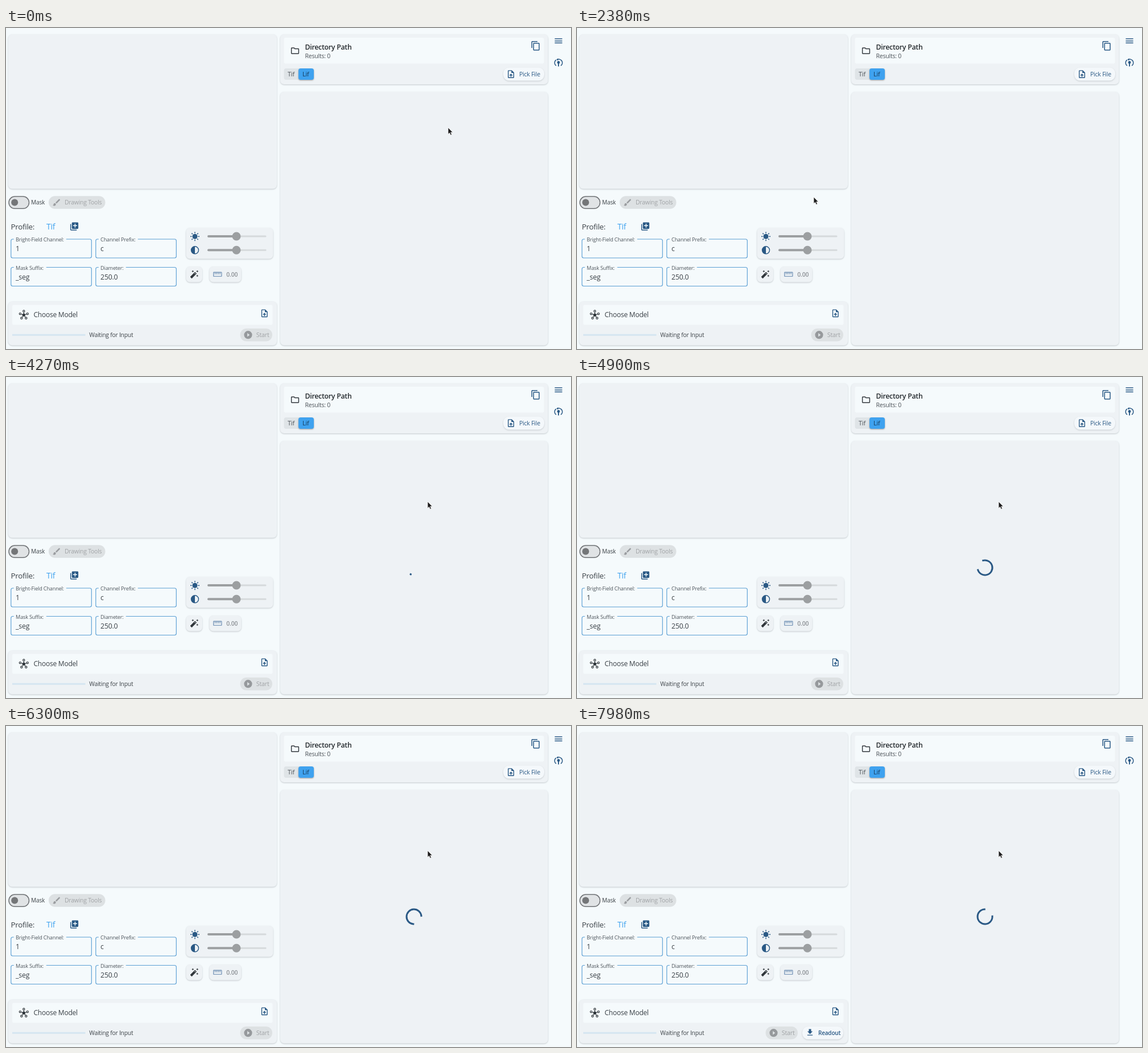
Animation, 993 px wide and 564 px high, one loop 8 s. Source, as an HTML page:

```html
<!DOCTYPE html>
<html lang="en">
<head>
<meta charset="utf-8">
<title>Segmentation panel</title>
<style>
  html, body { margin: 0; width: 100%; height: 100%; overflow: hidden; background: #f5fafc; }
  svg { display: block; width: 100%; height: 100%; }
  text { font-family: "Open Sans", "Noto Sans", sans-serif; letter-spacing: -.02em; white-space: pre; }
  .card { fill: #eef2f5; filter: drop-shadow(0 1px 1px rgba(40, 50, 60, .24)); }
  .soft { fill: #f4f8fb; filter: drop-shadow(0 1px .8px rgba(40, 50, 60, .2)); }
  .off { fill: #dde1e3; }
  .field { fill: none; stroke: #5b9fd4; stroke-width: 1.15; }
</style>
</head>
<body>
<svg id="stage" viewBox="0 0 993 564" xmlns="http://www.w3.org/2000/svg"></svg>
<script>
const NS = 'http://www.w3.org/2000/svg';
const stage = document.getElementById('stage');
const BG = '#f5fafc', NAVY = '#2a5985', INK = '#30363b', GREY = '#9a9da0', BLUE = '#3fa2ef';

const ICONS = {
  folder: 'M9.17 6l2 2H20v10H4V6h5.17M10 4H4c-1.1 0-1.99.9-1.99 2L2 18c0 1.1.9 2 2 2h16c1.1 0 2-.9 2-2V8c0-1.1-.9-2-2-2h-8l-2-2z',
  copy: 'M16 1H4c-1.1 0-2 .9-2 2v14h2V3h12V1zm3 4H8c-1.1 0-2 .9-2 2v14c0 1.1.9 2 2 2h11c1.1 0 2-.9 2-2V7c0-1.1-.9-2-2-2zm0 16H8V7h11v14z',
  menu: 'M3 18h18v-2H3v2zm0-5h18v-2H3v2zm0-7v2h18V6H3z',
  upload: 'M14 2H6c-1.1 0-2 .9-2 2v16c0 1.1.9 2 2 2h12c1.1 0 2-.9 2-2V8l-6-6zm4 18H6V4h7v5h5v11zM8 15l1.4 1.4 1.6-1.6V19h2v-4.2l1.6 1.6L16 15l-4-4z',
  add: 'M4 6H2v14c0 1.1.9 2 2 2h14v-2H4V6zm16-4H8c-1.1 0-2 .9-2 2v12c0 1.1.9 2 2 2h12c1.1 0 2-.9 2-2V4c0-1.1-.9-2-2-2zm-1 9h-4v4h-2v-4H9V9h4V5h2v4h4v2z',
  brush: 'M7 14c-1.66 0-3 1.34-3 3 0 1.31-1.16 2-2 2 .92 1.22 2.49 2 4 2 2.21 0 4-1.79 4-4 0-1.66-1.34-3-3-3zm13.71-9.37l-1.34-1.34c-.39-.39-1.02-.39-1.41 0L9 12.25 11.75 15l8.96-8.96c.39-.39.39-1.02 0-1.41z',
  ruler: 'M21 6H3c-1.1 0-2 .9-2 2v8c0 1.1.9 2 2 2h18c1.1 0 2-.9 2-2V8c0-1.1-.9-2-2-2zm0 10H3V8h2v4h2V8h2v4h2V8h2v4h2V8h2v4h2V8h2v8z',
  play: 'M12 2a10 10 0 1 0 0 20 10 10 0 0 0 0-20zm-2 14.5v-9l6 4.5-6 4.5z',
  download: 'M19 9h-4V3H9v6H5l7 7 7-7zM5 18v2h14v-2H5z',
  wand: 'M20 7l.94-2.06L23 4l-2.06-.94L20 1l-.94 2.06L17 4l2.06.94zM8.5 7l.94-2.06L11.5 4l-2.06-.94L8.5 1l-.94 2.06L5.5 4l2.06.94zM20 12.5l-.94 2.06-2.06.94 2.06.94.94 2.06.94-2.06 2.06-.94-2.06-.94zM14.2 6l-.7.3L2.3 17.5a1 1 0 0 0 0 1.4l2.8 2.8a1 1 0 0 0 1.4 0L17.7 10.5a1 1 0 0 0 0-1.4l-2.8-2.8zM14.2 8.4l1.4 1.4-1.3 1.3-1.4-1.4z'
};

function add(tag, attrs, parent = stage) {
  const el = document.createElementNS(NS, tag);
  for (const key in attrs) el.setAttribute(key, attrs[key]);
  parent.appendChild(el);
  return el;
}
const box = (x, y, w, h, rx, look, parent) => add('rect', { x, y, width: w, height: h, rx, ...look }, parent);
const dot = (cx, cy, r, look, parent) => add('circle', { cx, cy, r, ...look }, parent);
const line = (d, stroke, width, look, parent) =>
  add('path', { d, stroke, 'stroke-width': width, fill: 'none', ...look }, parent);

function label(x, y, size, str, fill = INK, weight = 400, parent = stage) {
  add('text', { x, y, 'font-size': size, 'font-weight': weight, fill }, parent).textContent = str;
}
function icon(name, cx, cy, size, fill = NAVY, parent = stage) {
  const s = size / 24;
  add('path', { d: ICONS[name], fill, 'fill-rule': 'evenodd',
    transform: `translate(${cx - size / 2} ${cy - size / 2}) scale(${s})` }, parent);
}
const card = (x, y, w, h, rx = 7) => box(x, y, w, h, rx, { class: 'card' });
function around(n, start, fn) {
  for (let i = 0; i < n; i++) {
    const a = start + i * 2 * Math.PI / n;
    fn(Math.cos(a), Math.sin(a));
  }
}

function drawFiles() {
  card(482, 11, 470.5, 88);
  box(488.5, 17, 457, 45.5, 3, { fill: BG });
  icon('folder', 508, 40, 17, INK);
  label(525.5, 38, 12.3, 'Directory Path', '#24292d', 600);
  label(525.5, 52.6, 10.5, 'Results: 0', '#4a5056');
  icon('copy', 931, 31.3, 18);
  box(488.5, 71, 40, 20, 4, { fill: '#dfe4e7' });
  box(514, 71, 27, 20, 4, { fill: BLUE, style: 'filter:drop-shadow(0 1px 1.2px rgba(0,0,0,.35))' });
  label(495, 84.7, 11, 'Tif', '#4b5157');
  label(521, 84.7, 11, 'Lif', '#173d5f');
  box(874, 69.5, 72, 23, 10, { class: 'soft' });
  icon('upload', 887.5, 81, 16.5);
  label(902, 84.7, 10.5, 'Pick File', NAVY, 500);
  card(482, 112, 470.5, 445.5);

  icon('menu', 971, 22.7, 17.5);
  line('M967 66.2A6 6 0 0 1 966.8 56.2M975 66.2A6 6 0 0 0 975.2 56.2A6 6 0 0 0 968.8 55.4', NAVY, 1.4);
  add('path', { d: 'M970.3 53.2v4.4l-3-2.2z', fill: NAVY });
  dot(971, 60.5, 2.4, { fill: NAVY });
  line('M971 61v6.5', NAVY, 1.9);
}

function drawField(x, y, name, value, gap) {
  box(x, y, 141.5, 33, 3, { class: 'field' });
  box(x + 5, y - 2, gap, 4, 0, { fill: BG });
  label(x + 8.3, y + 4, 9.15, name, '#4d555c');
  label(x + 8.3, y + 21, 12.3, value, '#3a4046');
}

function drawSlider(y) {
  line(`M405 ${y}H456`, '#d6dadc', 3, { 'stroke-linecap': 'round' });
  line(`M356 ${y}H405`, '#9c9fa1', 4, { 'stroke-linecap': 'round' });
  dot(405, y, 7.5, { fill: '#9c9fa1' });
}

function drawControls() {
  card(4, 11, 472, 271.5);
  box(5, 296, 35.5, 21.3, 10.6, { fill: '#e0e3e5', stroke: '#707376', 'stroke-width': 1.5 });
  dot(15.2, 306.6, 6, { fill: '#747678' });
  label(44, 310.4, 10.2, 'Mask', '#3d4348');
  box(75, 295.3, 99.5, 22.4, 11.2, { class: 'off' });
  icon('brush', 89, 306.5, 16, GREY);
  label(103, 310.4, 10.4, 'Drawing Tools', '#a0a3a6');

  label(8.5, 354, 13.4, 'Profile:', '#3a4046');
  label(71, 354, 14, 'Tif', BLUE, 500);
  icon('add', 120, 348.7, 17);
  drawField(8.8, 371, 'Bright-Field Channel:', '1', 92);
  drawField(157.8, 371, 'Channel Prefix:', 'c', 69);
  drawField(8.8, 420.5, 'Mask Suffix:', '_seg', 57);
  drawField(157.8, 420.5, 'Diameter:', '250.0', 48);

  card(316.5, 351, 153, 54.5);
  dot(332, 366.3, 4.5, { fill: NAVY });
  around(8, 0, (c, s) =>
    line(`M${332 + 5.7 * c} ${366.3 + 5.7 * s}L${332 + 8 * c} ${366.3 + 8 * s}`, NAVY, 1.5));
  dot(332, 390.3, 6.5, { fill: 'none', stroke: NAVY, 'stroke-width': 1.4 });
  add('path', { d: 'M332 383.8a6.5 6.5 0 0 0 0 13z', fill: NAVY });
  drawSlider(366);
  drawSlider(390.3);

  card(316.5, 419, 28.5, 27.5);
  icon('wand', 330.7, 433, 16.5, INK);
  card(357.5, 419, 56, 27.5);
  icon('ruler', 371.8, 432.8, 17, '#7f9cbc');
  label(387.3, 436.6, 10.4, '0.00', '#8d9196', 600);
}

function drawModel() {
  card(4, 480.5, 472, 77);
  box(11, 486.5, 457.5, 35, 3, { fill: BG });
  around(5, -Math.PI / 2, (c, s) => {
    line(`M31.3 504.2L${31.3 + 5 * c} ${504.2 + 5 * s}`, INK, 1.1);
    dot(31.3 + 6.8 * c, 504.2 + 6.8 * s, 1.6, { fill: 'none', stroke: INK, 'stroke-width': 1.2 });
  });
  dot(31.3, 504.2, 2.6, { fill: INK });
  label(48.5, 508.2, 12, 'Choose Model', '#3a4046');
  icon('upload', 454.3, 501.3, 16.5);
  line('M11 539.3H139.5', '#d5e5f1', 3);
  label(146.3, 543.2, 10.3, 'Waiting for Input', '#3d4348');
}

drawFiles();
drawControls();
drawModel();

const start = add('g', {});
box(411.5, 528, 56.5, 22.5, 11.2, { class: 'off' }, start);
icon('play', 425.5, 539.2, 17, '#96999c', start);
label(439.8, 543.2, 10.7, 'Start', '#a0a3a6', 400, start);

const readout = add('g', {});
box(396, 528, 72, 22.5, 10, { class: 'soft' }, readout);
icon('download', 409.5, 538.5, 16, NAVY, readout);
label(424, 543.2, 10, 'Readout', NAVY, 600, readout);

const spinner = line('', NAVY, 3, { 'stroke-linecap': 'square' });
const pointer = add('path', {
  d: 'M0 0V11.6L2.6 9.2 4.4 13.2 6.5 12.3 4.7 8.4H8.2Z',
  fill: '#1c1c1c', stroke: '#fff', 'stroke-width': .7, 'stroke-linejoin': 'round'
});

// Linear track through [time, ...values] points.
function track(points, t) {
  if (t <= points[0][0]) return points[0].slice(1);
  for (let i = 1; i < points.length; i++) {
    const a = points[i - 1], b = points[i];
    if (t <= b[0]) {
      const u = (t - a[0]) / (b[0] - a[0]);
      return a.slice(1).map((v, j) => v + (b[j + 1] - v) * u);
    }
  }
  return points[points.length - 1].slice(1);
}

// Cubic bezier easing (.4, 0, .2, 1).
function ease(x) {
  if (x <= 0) return 0;
  if (x >= 1) return 1;
  let lo = 0, hi = 1, s = .5;
  for (let i = 0; i < 24; i++) {
    s = (lo + hi) / 2;
    const bx = 1.2 * s * (1 - s) ** 2 + .6 * s * s * (1 - s) + s ** 3;
    if (bx < x) lo = s; else hi = s;
  }
  return 3 * s * s * (1 - s) + s ** 3;
}

function spinnerPath(ms) {
  const p = ms % 1333 / 1333, turn = ms % 2222 / 2222;
  const head = ease(p * 2), tail = ease(p * 2 - 1);
  const a = Math.PI * (-.5 + 1.5 * tail + 2 * turn + .5 * p);
  const sweep = Math.max(1.5 * Math.PI * (head - tail), .01);
  const at = r => `${717 + 13 * Math.cos(r)} ${335 + 13 * Math.sin(r)}`;
  return `M${at(a)}A13 13 0 ${sweep > Math.PI ? 1 : 0} 1 ${at(a + sweep)}`;
}

const POINTER = [[3, 777, 175], [5, 729, 193], [8, 602, 240], [11, 475, 287], [12, 436, 294], [13, 416, 297],
  [32, 416, 297], [34, 482, 281], [37, 674, 235], [39, 741, 219]];
const SPIN = [[28, 0], [41, 1292], [53, 2503], [68, 3910], [76, 4690]];

function render(t) {
  const step = 2 * Math.floor(t / 210) + (t % 210 >= 70 ? 1 : 0);
  const [x, y] = track(POINTER, step);
  pointer.setAttribute('transform', `translate(${x} ${y})`);

  const loading = step >= 28;
  spinner.style.display = loading ? '' : 'none';
  if (loading) spinner.setAttribute('d', spinnerPath(track(SPIN, step)[0]));

  const ready = step >= 72;
  readout.style.display = ready ? '' : 'none';
  start.setAttribute('transform', `translate(${ready ? -80 : 0} 0)`);
}

let origin = null;
function tick(now) {
  if (origin === null) origin = now;
  render(Math.max(0, now - origin) % 8000);
  requestAnimationFrame(tick);
}
render(0);
requestAnimationFrame(tick);
</script>
</body>
</html>
```
